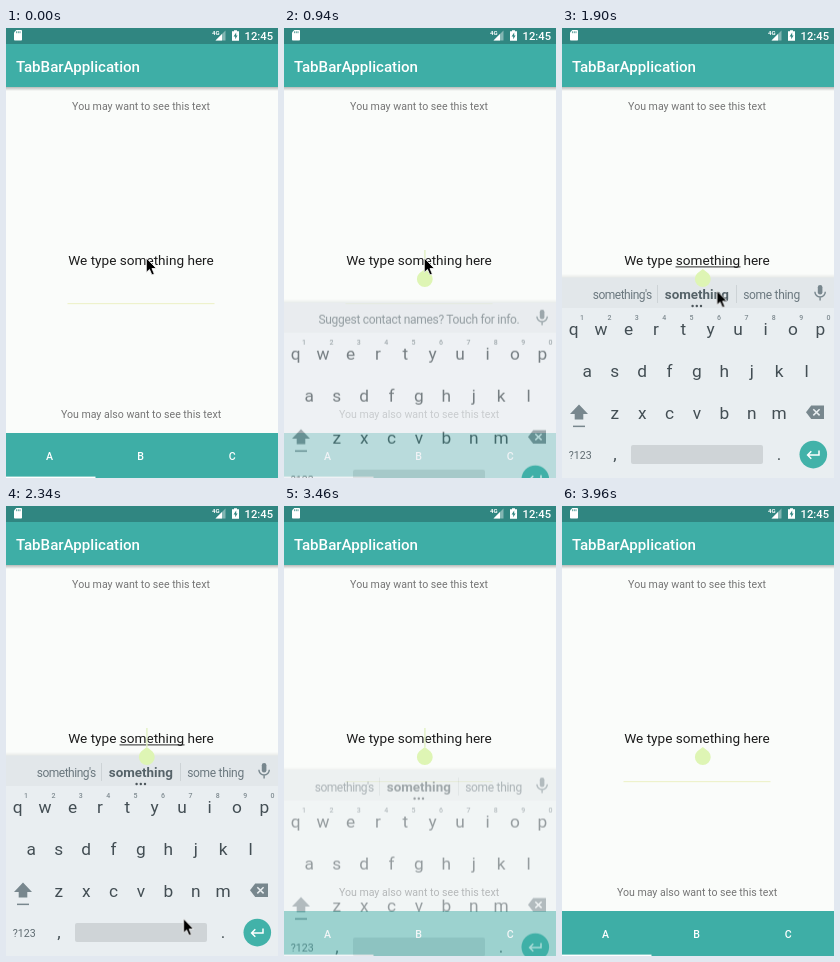
An HTML page that plays this animation: 272x450 px, repeating every 5000 ms.

```html
<!DOCTYPE html>
<html lang="en">
<head>
<meta charset="utf-8">
<title>Tab bar and keyboard</title>
<style>
html, body { margin: 0; width: 100%; height: 100%; overflow: hidden; background: #fafcfa; }
svg { display: block; width: 272px; height: 450px; font-family: Roboto, "Open Sans", sans-serif; }
.mid { text-anchor: middle; }
.label { font-size: 10.58px; fill: #757575; }
.tab { font-size: 10.58px; font-weight: 500; fill: #fff; }
.key { font-size: 17.3px; fill: #434e54; }
.hint { font-size: 7px; font-weight: 500; fill: #7f8b91; }
.word { font-size: 12px; fill: #6b787f; }
.icon { fill: #78878e; }
</style>
</head>
<body>
<svg viewBox="0 0 272 450">
  <defs>
    <linearGradient id="shade" x2="0" y2="1">
      <stop offset="0" stop-color="#000" stop-opacity=".26"/>
      <stop offset="1" stop-color="#000" stop-opacity="0"/>
    </linearGradient>
    <linearGradient id="lift" x2="0" y2="1">
      <stop offset="0" stop-color="#000" stop-opacity="0"/>
      <stop offset="1" stop-color="#000" stop-opacity=".08"/>
    </linearGradient>
  </defs>

  <rect width="272" height="450" fill="#fafcfa"/>
  <rect y="59" width="272" height="4" fill="url(#shade)"/>
  <rect y="16" width="272" height="43" fill="#3eaea6"/>
  <rect width="272" height="16" fill="#308681"/>

  <!-- status icons -->
  <g fill="#fff">
    <path d="M10.3 2H15.2Q16 2 16 2.8V11.7Q16 12.5 15.2 12.5H8.8Q8 12.5 8 11.7V4.4Z"/>
    <path d="M10.6 3.3V5.2M12.3 3.3V5.2M14 3.3V5.2" stroke="#308681" stroke-width=".8"/>
    <path d="M219.5 2.5V12.5H209.5Z" opacity=".4"/>
    <path d="M216 6V12.5H209.5Z"/>
    <text x="206" y="6.6" font-size="6" font-weight="700">4G</text>
    <path d="M228 2.2H231V3.2H233V12.7H226V3.2H228Z"/>
    <path d="M230.2 4.6L227.6 8.4H229.2V11.2L231.6 7.4H230.2Z" fill="#308681"/>
    <text x="267" y="11.6" font-size="11.2" font-weight="500" text-anchor="end">12:45</text>
  </g>

  <text x="10" y="43.6" font-size="15.1" font-weight="500" fill="#fff">TabBarApplication</text>
  <text class="label mid" x="135" y="82">You may want to see this text</text>
  <text class="label mid" x="135" y="390">You may also want to see this text</text>

  <rect x="61.5" y="275" width="147" height="1.2" fill="#eef2cc"/>
  <text class="mid" x="135" y="236.8" font-size="13.6" fill="#1c1c1c">We type something here</text>
  <rect id="compose" x="113.5" y="238.4" width="65" height="1" fill="#2a2a2a"/>
  <rect id="caret" x="140.2" y="222" width="1.4" height="19" fill="#e2f0c4"/>

  <rect y="405" width="272" height="45" fill="#3eaea6"/>
  <g class="mid">
    <text class="tab" x="43.5" y="432">A</text>
    <text class="tab" x="134.7" y="432">B</text>
    <text class="tab" x="226.2" y="432">C</text>
  </g>
  <rect y="448.6" width="89.5" height="1.4" fill="#fff"/>

  <g id="board">
    <rect y="246" width="272" height="4" fill="url(#lift)"/>
    <rect y="249.5" width="272" height="31" fill="#e2e7ea"/>
    <rect y="280" width="272" height="170" fill="#e9eef1"/>
    <g id="ask">
      <text class="word mid" x="135" y="270.5" letter-spacing="-.3">Suggest contact names? Touch for info.</text>
    </g>
    <g id="words" class="mid">
      <text class="word" x="60.3" y="270.5" letter-spacing="-.5">something's</text>
      <text class="word" x="134.8" y="270.5" style="font-size:13.4px;font-weight:700;fill:#566369">something</text>
      <text class="word" x="209.5" y="270.5" letter-spacing="-.3">some thing</text>
      <path d="M95.5 257V275M174.5 257V275" stroke="#cdd3d6"/>
      <g fill="#4c565b"><circle cx="130.6" cy="278" r="1.2"/><circle cx="134.8" cy="278" r="1.2"/><circle cx="139" cy="278" r="1.2"/></g>
    </g>
    <g class="icon">
      <rect x="255.8" y="257" width="4.6" height="9.6" rx="2.3"/>
      <path d="M252.9 263.8A5.2 5.2 0 0 0 263.3 263.8M258.1 269V272.5" fill="none" stroke="#78878e" stroke-width="1.4"/>
      <path d="M17 376.5L26 386H21.3V391.5H12.7V386H8Z"/>
      <rect x="11" y="397.6" width="12" height="1.5"/>
      <path d="M249.2 377.5H262V391H249.2L244 384.2Z"/>
      <path d="M251.3 381.2L257.6 387.4M257.6 381.2L251.3 387.4" stroke="#e9eef1" stroke-width="1.5"/>
    </g>
    <g id="keys" class="mid">
      <text x="18.3" y="430.5" font-size="10.6" fill="#5f6b71">?123</text>
      <text class="key" x="53" y="432">,</text>
      <text class="key" x="217" y="432">.</text>
    </g>
    <rect x="69" y="417" width="132" height="19" rx="2" fill="#cfd4d7"/>
    <circle cx="251.3" cy="426.6" r="13.8" fill="#42b2a9"/>
    <path d="M257 422.5V427H245.8M249.3 423.3L245.6 427L249.3 430.7" fill="none" stroke="#fff" stroke-width="1.5"/>
  </g>

  <path id="handle" d="M140.8 241L146.5 245.6A7.9 7.9 0 1 1 135.1 245.6Z" fill="#def5b4"/>
  <path id="arrow" d="M140.3 230V244.4L143.5 241.4L145.9 246.9L148.3 245.9L146 240.5H150.4Z" fill="#000" stroke="#fff" stroke-width=".8"/>
</svg>
<script>
const LOOP = 5000;
const el = id => document.getElementById(id);

function addText(cls, x, y, str) {
  const t = document.createElementNS("http://www.w3.org/2000/svg", "text");
  t.setAttribute("class", cls);
  t.setAttribute("x", x);
  t.setAttribute("y", y);
  t.textContent = str;
  el("keys").append(t);
}

const STEP = 27.4;
[["qwertyuiop", 11.7, 306.5], ["asdfghjkl", 25.3, 348.7], ["zxcvbnm", 52.8, 390.7]]
  .forEach(([row, x, y]) => [...row].forEach((c, i) => addText("key", x + i * STEP, y, c)));
[..."1234567890"].forEach((c, i) => addText("hint", 20 + i * STEP, 291.5, c));

const play = (id, frames) => el(id).animate(frames, { duration: LOOP, iterations: Infinity });

// Hard on/off: hidden at first, toggled at each time
function blink(id, times) {
  const frames = [{ offset: 0, opacity: 0 }];
  times.forEach((t, i) => frames.push(
    { offset: t / LOOP, opacity: i % 2 },
    { offset: t / LOOP, opacity: 1 - i % 2 }));
  frames.push({ offset: 1, opacity: times.length % 2 });
  play(id, frames);
}

// Rows: time, x, y, opacity, easing to the next row
const move = (id, rows) => play(id, rows.map(([t, x, y, opacity, easing = "linear"]) =>
  ({ offset: t / LOOP, transform: `translate(${x}px, ${y}px)`, opacity, easing })));

blink("handle", [700]);
blink("caret", [700, 1520, 2120, 2720, 3320, 3960]);
blink("compose", [1100, 3400]);
blink("ask", [700, 1100]);
blink("words", [1100]);

move("board", [
  [0, 0, 100, 0],
  [760, 0, 100, 0],
  [880, 0, 46, .48],
  [960, 0, 18, .8],
  [1060, 0, 0, 1],
  [3330, 0, 0, 1],
  [3460, 0, 14.5, .56],
  [3600, 0, 20, 0],
  [5000, 0, 20, 0]
]);

move("arrow", [
  [0, 0, 0, 1],
  [1730, 0, 0, 1, "ease-in-out"],
  [2260, 67, 150, 1],
  [2340, 37.5, 182, 1],
  [2420, 8, 225, 1],
  [2420, 8, 225, 0],
  [5000, 8, 225, 0]
]);
</script>
</body>
</html>
```
